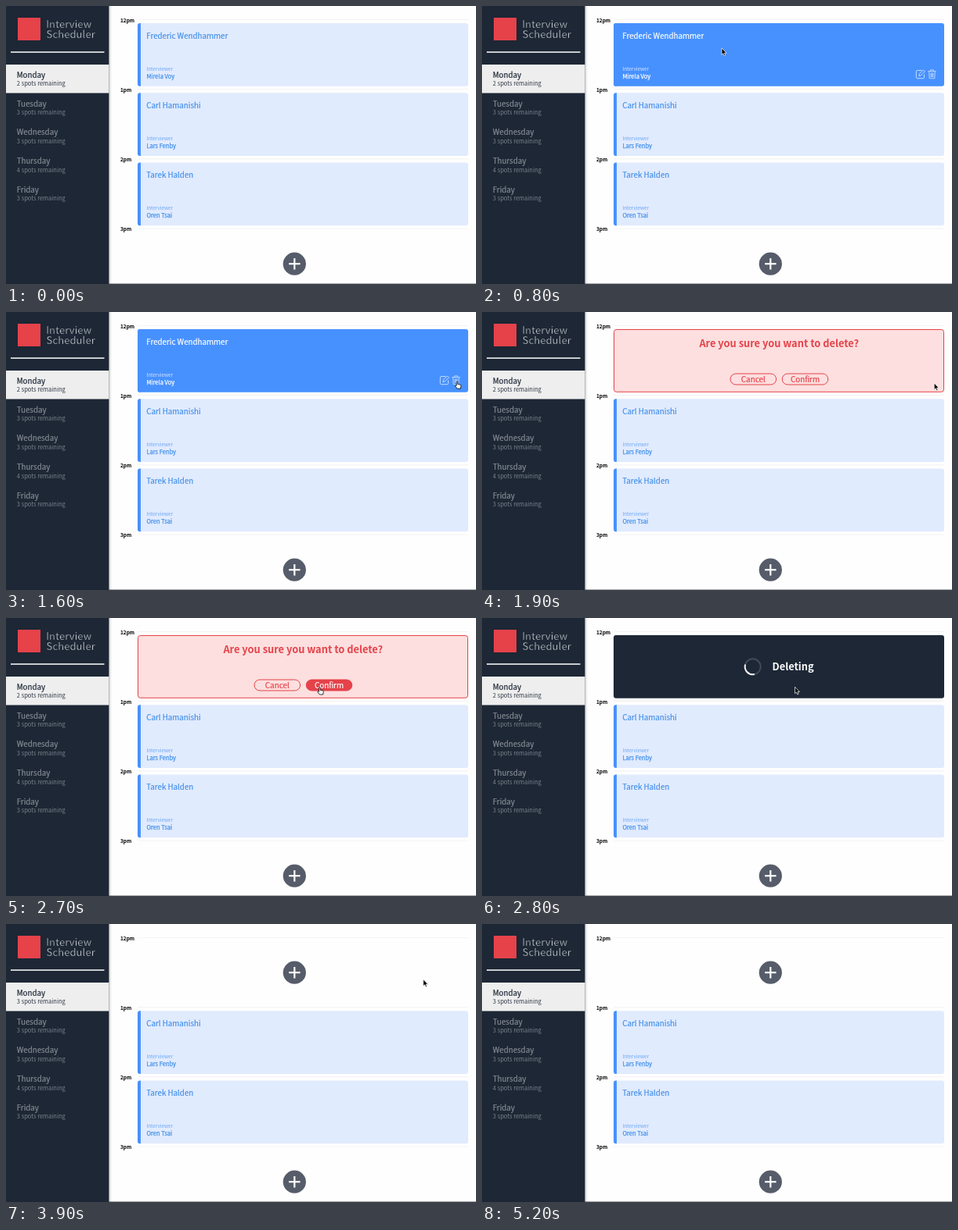
Recreate the animation shown at these times as an HTML page. Size 600 px wide and 356 px high, loop 5.3 s.

```html
<!DOCTYPE html>
<html lang="en">
<head>
<meta charset="utf-8">
<title>Interview Scheduler</title>
<style>
  html, body { margin: 0; width: 100%; height: 100%; overflow: hidden; background: #fefefe; }
  svg { display: block; width: 600px; height: 356px; font-family: "Noto Sans CJK JP", "Noto Sans CJK SC", "Noto Sans", sans-serif; }
  /* A thin stroke fine-tunes the weight of the letters */
  text { fill: currentColor; stroke: currentColor; stroke-width: 0; }
  .name { font-size: 9.75px; stroke-width: .2px; }
  .spots { font-size: 7.5px; font-weight: 300; }
  .role { font-size: 6.3px; font-weight: 300; }
  .person { font-size: 7.5px; font-weight: 500; stroke-width: .25px; }
  .hour { font-size: 6.5px; font-weight: 700; }
  .title { font-size: 13px; font-weight: 300; letter-spacing: .1px; fill: #d5d9df; stroke: #1d2735; stroke-width: .35px; }
  .message { font-size: 12.8px; font-weight: 700; }
  .button { font-size: 9.9px; font-weight: 500; text-anchor: middle; stroke-width: .2px; }
  .line { fill: none; stroke-linecap: round; stroke-linejoin: round; }
</style>
</head>
<body>
<svg id="stage" viewBox="0 0 600 356"></svg>
<script>
const LOOP = 5300, STEP = 100;
const DARK = '#1d2735', BLUE = '#4791ff', RED = '#e5424a';
const ROW = 36.75, SLOT = 89.2;

const text = (cls, x, y, color, str, extra = '') =>
  `<text class="${cls}" x="${x}" y="${y}" color="${color}" ${extra}>${str}</text>`;
const rect = (x, y, w, h, fill, extra = '') =>
  `<rect x="${x}" y="${y}" width="${w}" height="${h}" fill="${fill}" ${extra}/>`;

const day = (name, spots, i) => {
  const y = i * ROW, active = i === 0;
  return text('name', 13.7, 91.9 + y, active ? DARK : '#858b95', name) +
    text('spots', 13.8, 102.4 + y, active ? '#303846' : '#7a818c', `${spots} spots remaining`,
      active ? 'id="spots"' : '');
};

const hour = (label, i) =>
  rect(168, 17 + i * SLOT, 422, .8, '#f0f0f1') +
  text('hour', 146, 20.6 + i * SLOT, '#000', label);

const card = (name, interviewer, i, hovered) => {
  const ink = hovered ? '#fff' : '#4390ea';
  return `<g transform="translate(0 ${i * SLOT})">` +
    rect(168, 22, 422, 80.8, hovered ? BLUE : '#e1ebfe', 'rx="3"') +
    `<path d="M172 22V102.8H171A3 3 0 0 1 168 99.8V25A3 3 0 0 1 171 22Z" fill="${BLUE}"/>` +
    text('name', 179.3, 41.5, ink, name) +
    text('role', 179.4, 82.7, hovered ? '#d6e6ff' : '#6ba6f3', 'Interviewer') +
    text('person', 179.4, 92.6, ink, interviewer) + '</g>';
};

const addButton = y => `<circle cx="368.3" cy="${y}" r="14.6" fill="#565c69"/>
  <path d="M361.1 ${y}h14.4M368.3 ${y - 7.2}v14.4" stroke="#fff" stroke-width="2.2"/>`;

const button = (x, label, id) => `<g id="${id}">` +
  rect(x, 79, 58.6, 14, 'none', `rx="7" stroke="${RED}"`) +
  text('button', x + 29.3, 89.7, RED, label) + '</g>';

const FIRST = ['Frederic Wendhammer', 'Mirela Voy', 0];

const icons = `<g class="line" stroke="#c3dbff">
  <path d="M561 82.5h-5.2q-1.5 0-1.5 1.5v7.2q0 1.5 1.5 1.5h7.2q1.5 0 1.5-1.5V88"/>
  <path d="M558 89.3l.4-2.4 5-5 2 2-5 5z"/>
  <path d="M569.7 83.6h9.6M572.6 83.4v-1.6h3.8v1.6M570.7 84l.5 8.7h6.6l.5-8.7M573 86v4.7M574.5 86v4.7M576 86v4.7" stroke-width=".9"/>
</g>`;

const views = {
  show: card(...FIRST, false),
  hover: card(...FIRST, true) + icons,
  confirm: rect(168.5, 22.5, 421, 79.8, '#fddfdf', `rx="3" stroke="${RED}"`) +
    text('message', 379.3, 45.1, RED, 'Are you sure you want to delete?', 'text-anchor="middle"') +
    button(317, 'Cancel', 'cancel') + button(383.2, 'Confirm', 'accept'),
  deleting: rect(168, 22, 422, 80.8, DARK, 'rx="3"') +
    `<g class="line" transform="translate(345.7 62.3)" stroke-width="2">
      <circle r="10" stroke="#424a58"/>
      <path id="spinner" d="M-9.8 -2A10 10 0 0 0 1.5 9.9" stroke="#f2f3f5"/></g>` +
    text('message', 370.6, 67, '#fff', 'Deleting'),
  empty: addButton(62.2)
};

const stage = document.getElementById('stage');
stage.innerHTML = `
  <defs><linearGradient id="shade">
    <stop stop-color="#000" stop-opacity=".16"/><stop offset="1" stop-color="#000" stop-opacity="0"/>
  </linearGradient></defs>` +
  rect(0, 0, 600, 356, '#fefefe') + rect(0, 355, 600, 1, '#a4a6aa') +
  rect(131.5, 0, 3.5, 356, 'url(#shade)') + rect(0, 0, 131.5, 356, DARK) +
  rect(15, 15, 29, 29, RED) +
  text('title', 51.2, 28, '', 'Interview') + text('title', 51.6, 41.2, '', 'Scheduler') +
  rect(6, 58.3, 119.5, 1.5, '#fff') + rect(0, 75, 131.5, 36.5, '#eeeeee') +
  [['Monday', 2], ['Tuesday', 3], ['Wednesday', 3], ['Thursday', 4], ['Friday', 3]]
    .map(([name, spots], i) => day(name, spots, i)).join('') +
  ['12pm', '1pm', '2pm', '3pm'].map(hour).join('') +
  Object.entries(views).map(([id, body]) => `<g id="${id}">${body}</g>`).join('') +
  card('Carl Hamanishi', 'Lars Fenby', 1) + card('Tarek Halden', 'Oren Tsai', 2) +
  addButton(330.2) +
  `<g id="cursor" stroke-linejoin="round">
    <path id="arrow" d="M0 0V8.4L1.9 6.7 3.3 9.7 4.7 9 3.4 6.2H6Z" fill="#000" stroke="#fff" stroke-width=".7"/>
    <path id="hand" d="M.6 .4Q1.7 .2 1.7 1.2V4L4.8 4.7Q6 5 5.8 6.2L5.2 9.7H.9L-1.6 6.6Q-2 5.5 -.9 5.4L.1 6V1.2Q.1 .5 .6 .4Z" fill="#fff" stroke="#000" stroke-width=".8"/>
  </g>`;

const el = id => document.getElementById(id);
const toggle = (id, on) => el(id).setAttribute('display', on ? 'inline' : 'none');

// Start time of each state of the first slot
const timeline = [[0, 'show'], [800, 'hover'], [1800, 'confirm'], [2800, 'deleting'], [3800, 'empty']];

// Pointer stops: time, x, y
const stops = [[800, 306, 54], [900, 312.7, 58], [1400, 574, 87], [1900, 577.2, 91], [2000, 577, 91],
  [2500, 399.5, 88.3], [3600, 399.5, 88.3], [3900, 532.7, 71], [4100, 585, 62]];

function pointerAt(t) {
  const i = Math.max(1, stops.findIndex(s => s[0] >= t));
  const [t0, x0, y0] = stops[i - 1], [t1, x1, y1] = stops[i];
  const u = Math.min(1, Math.max(0, (t - t0) / (t1 - t0))), k = u * u * (3 - 2 * u);
  return [x0 + (x1 - x0) * k, y0 + (y1 - y0) * k];
}

function draw(t) {
  const state = timeline.filter(s => s[0] <= t).pop()[1];
  for (const id in views) toggle(id, id === state);

  const accepting = t >= 2500;
  el('accept').firstChild.setAttribute('fill', accepting ? RED : 'none');
  el('accept').lastChild.setAttribute('color', accepting ? '#fff' : RED);
  el('spinner').setAttribute('transform', `rotate(${(t - 2800) * .36})`);
  el('spots').textContent = `${state === 'empty' ? 3 : 2} spots remaining`;

  const pressing = (t >= 1400 && t < 1800) || (t >= 2500 && t < 2800);
  toggle('cursor', t >= 800 && t < 4100);
  toggle('hand', pressing);
  toggle('arrow', !pressing);
  el('cursor').setAttribute('transform', `translate(${pointerAt(t)})`);
}

const start = performance.now();
function tick() {
  const t = (performance.now() - start) % LOOP;
  draw(Math.floor(t / STEP) * STEP);
  requestAnimationFrame(tick);
}
tick();
</script>
</body>
</html>
```
